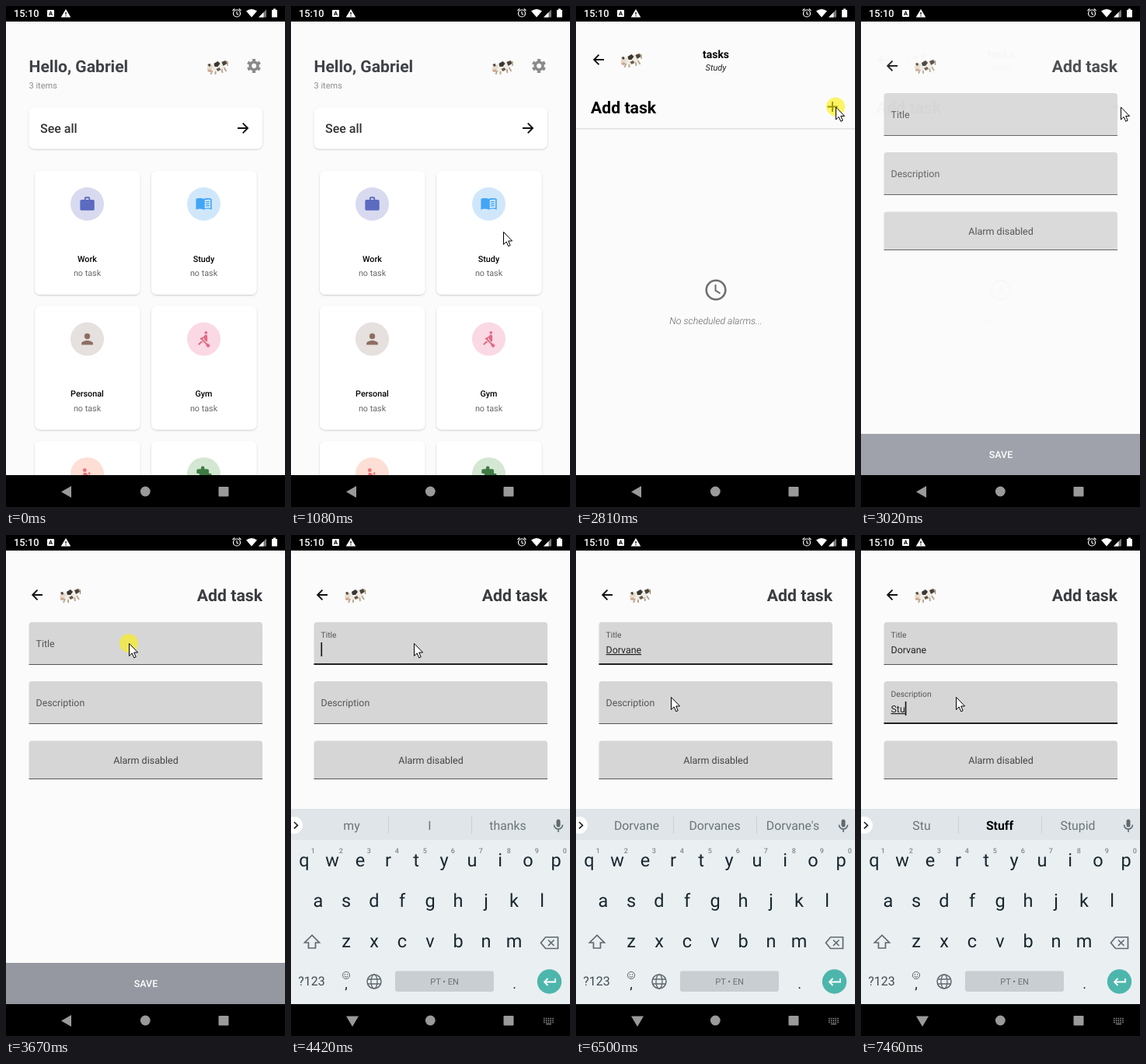
An HTML page for the animation above (8000 ms loop, 359 px wide and 644 px high).

```html
<!DOCTYPE html>
<html lang="en">
<head>
<meta charset="utf-8">
<title>Task app</title>
<style>
  html, body { margin: 0; width: 100%; height: 100%; overflow: hidden; background: #000; }
  svg { display: block; width: 100%; height: 100%; font-family: Roboto, sans-serif; text-rendering: geometricPrecision; }
  .mid { text-anchor: middle; }
  .line { fill: none; stroke: currentColor; }
</style>
</head>
<body>
<svg id="stage" viewBox="0 0 359 644"></svg>
<script>
const LOOP = 8000;
const NAME = 'Gabriel', TITLE = 'Dorvane';

const text = (x, y, size, str, attrs = '') =>
  `<text x="${x}" y="${y}" font-size="${size}" ${attrs}>${str}</text>`;
const mid = (x, y, size, str, attrs = '') => text(x, y, size, str, 'class="mid" ' + attrs);
const rect = (x, y, w, h, fill, attrs = '') =>
  `<rect x="${x}" y="${y}" width="${w}" height="${h}" fill="${fill}" ${attrs}/>`;
const circle = (x, y, r, fill, attrs = '') =>
  `<circle cx="${x}" cy="${y}" r="${r}" fill="${fill}" ${attrs}/>`;
const line = (d, color, width = 2, attrs = '') =>
  `<path class="line" d="${d}" color="${color}" stroke-width="${width}" ${attrs}/>`;
const shape = (d, fill) => `<path d="${d}" fill="${fill}"/>`;
const group = (id, body, attrs = '') => `<g id="${id}" ${attrs}>${body}</g>`;
const at = (x, y, body, scale = 1) => `<g transform="translate(${x} ${y}) scale(${scale})">${body}</g>`;

const backArrow = (x, y) => line(`M${x + 7} ${y}H${x - 6}m6.5 -6.3l-6.3 6.3 6.3 6.3`, '#111', 1.9);

const cow = (x, y) => at(x, y,
  line('M-6 5l-2 5M-2 6l0 4M6 2l1 6M9 1l3 5', '#b9a894', 2) +
  '<ellipse cx="1.5" cy="0" rx="10" ry="5.6" fill="#efece4" transform="rotate(-20)"/>' +
  shape('M-4 -4l5 -3 3 3 -3 4 -4 0z', '#3b3733') +
  shape('M6 -6l5 -2 2 4 -5 3z', '#4a433c') +
  shape('M-1 3l4 -2 2 3 -4 2z', '#6b5a48') +
  line('M11 -7l2.5 1 0 5', '#a58560', 1.2) +
  shape('M-12 -3l4 -1 3 3 -2 6 -4 1 -2 -3z', '#e6dccd') +
  shape('M-12 -3l3 -1 1 3 -2 1z', '#4a433c') +
  '<ellipse cx="-9.5" cy="5.3" rx="2.8" ry="1.8" fill="#d3a68f"/>');

const ICONS = {
  work: c => shape('M20 6h-4V4c0-1.1-.9-2-2-2h-4c-1.1 0-2 .9-2 2v2H4c-1.1 0-2 .9-2 2v11c0 1.1.9 2 2 2h16c1.1 0 2-.9 2-2V8c0-1.1-.9-2-2-2zm-6 0h-4V4h4z', c),
  study: c => shape('M12 5C9 3.5 4 3.5 1 5V20c3-1.5 8-1.5 11 0 3-1.5 8-1.5 11 0V5C20 3.5 15 3.5 12 5z', c) +
    shape('M13.3 6.6c2.4-1 5.6-1.1 8-.5V17.8c-2.5-.6-5.5-.4-8 .5z', '#d0e7fb') +
    line('M14.8 9.2q2.5-.8 5-.4m-5 3.2q2.5-.8 5-.4m-5 3.2q2.5-.8 5-.4', c, 1.4),
  person: c => circle(12, 8, 4, c) + shape('M12 14c-2.7 0-8 1.3-8 4v2h16v-2c0-2.7-5.3-4-8-4z', c),
  row: c => circle(15, 3, 2, c) +
    shape('M8.5 14.5L4 19l1.5 1.5L9 17h2zM21 21l-3 3-3-3v-1.5l-7.1-7.1-.9.1v-2.2c1.7 0 3.6-.9 4.7-2l1.4-1.6c.5-.5 1-.7 1.7-.7C16 6 17 7 17 8.3V14c0 .8-.3 1.6-.9 2.2l-3.6-3.6v-2.3c-.6.5-1.4 1-2.3 1.4L16.500 18H18z', c),
  play: c => circle(8.5, 6.5, 2.6, c) + shape('M6.500 10h4l3 4h-7zM14 9l2.500 1-1 3-2-1z', c),
  puzzle: c => shape('M20.5 11H19V7c0-1.1-.9-2-2-2h-4V3.5a2.5 2.5 0 0 0-5 0V5H4c-1.1 0-2 .9-2 2v3.800h1.500a2.700 2.700 0 0 1 0 5.400H2V20c0 1.100.900 2 2 2h13c1.100 0 2-.900 2-2v-4h1.500a2.500 2.500 0 0 0 0-5z', c)
};

function card(i, icon, name, back, color) {
  const x = 37 + i % 2 * 150, y = 212 + (i >> 1) * 173.6, cx = x + 67.5;
  return rect(x, y, 135.500, 159, '#fff', 'rx="7" filter="url(#shade)"') +
    circle(cx, y + 42.5, 21.5, back) +
    at(cx - 11, y + 31.5, ICONS[icon](color), .92) +
    mid(cx, y + 116.8, 10.8, name, 'font-weight="500"') +
    mid(cx, y + 135, 10.8, 'no task', 'fill="#666"');
}

const gear = line('M324 77a4.900 4.900 0 1 0 0 .01z', '#8a8a8a', 3.6) +
  `<circle cx="319" cy="77" r="7.500" class="line" color="#8a8a8a" stroke-width="3.200" pathLength="12" stroke-dasharray="1 1" stroke-dashoffset=".5" transform="rotate(30 319 77)"/>`;

const home =
  text(29.5, 85, 21.1, `Hello, ${NAME}`, 'font-weight="700" fill="#3f4247"') +
  text(29.5, 106, 11, '3 items', 'fill="#8c8c8c"') + cow(271.5, 78) + gear +
  rect(29.5, 130.5, 300.5, 53, '#fff', 'rx="7" filter="url(#shade)"') +
  text(44, 163.3, 16, 'See all', 'font-weight="500" fill="#333"') +
  line('M298 157h13m-6.300 -6.300l6.300 6.300 -6.300 6.300', '#111', 1.9) +
  card(0, 'work', 'Work', '#d8daef', '#5c6bc0') +
  card(1, 'study', 'Study', '#d0e7fb', '#42a5f5') +
  card(2, 'person', 'Personal', '#e6e0de', '#8d6e63') +
  card(3, 'row', 'Gym', '#fad9e4', '#e06a85') +
  card(4, 'play', '', '#fddfd6', '#f06f75') +
  card(5, 'puzzle', '', '#d3e7d3', '#3f7a45');

const tasks = backArrow(29, 69) + cow(70.5, 69) +
  mid(180, 67, 14, 'tasks', 'font-weight="700"') +
  mid(180, 82.5, 11, 'Study', 'font-style="italic" fill="#222"') +
  text(19, 138, 21.2, 'Add task', 'font-weight="700"') +
  line('M323.500 129.500h13m-6.500 -6.500v13', '#111', 1.9) +
  rect(0, 157, 359, 1.600, '#e0e0e0') +
  circle(180, 365, 12.3, 'none', 'stroke="#6f6f6f" stroke-width="2.600"') +
  line('M179.500 358v7.700l6 3.600', '#6f6f6f', 2) +
  mid(180, 409, 12.3, 'No scheduled alarms...', 'font-style="italic" font-weight="300" fill="#666"');

const field = (id, y, label) =>
  shape(`M29.500 ${y + 55}v-51q0-4 4-4h292.500q4 0 4 4v51z`, '#d6d6d6') +
  `<rect id="${id}Bar" x="29.500" width="300.500"/>` +
  `<text id="${id}Label" x="38.500" fill="#555">${label}</text>` +
  `<text id="${id}Text" x="38.500" y="${y + 40}" font-size="12.400" fill="#222"></text>` +
  `<rect id="${id}Caret" y="${y + 26}" width="1.600" height="18" fill="#111"/>`;

const add = rect(0, 20, 359, 583, '#fbfbfb') + backArrow(40, 77) + cow(82, 77) +
  text(330, 85, 21.2, 'Add task', 'font-weight="700" fill="#3a3c40" text-anchor="end"') +
  field('title', 112, 'Title') + field('desc', 188, 'Description') +
  shape('M29.500 314v-45.500q0-4 4-4h292.500q4 0 4 4v45.500z', '#d6d6d6') +
  rect(29.5, 313, 300.5, 1, '#555') +
  mid(180, 294, 12.5, 'Alarm disabled', 'fill="#444"') +
  rect(0, 550, 359, 53, '#9598a1') +
  mid(180, 581, 12.4, 'SAVE', 'font-weight="500" fill="#fff"');

const keyRow = (chars, x, y) => [...chars].map((c, i) => mid(x + 36 * i, y, 23.5, c)).join('');
const GREY = '#5f6a70';

const keyboard = rect(0, 352, 359, 251, '#eaeff2') + rect(0, 352, 359, 40, '#dfe5e8') +
  circle(4, 373, 11, '#fff') + line('M4 369l4.500 4.200 -4.500 4.200', '#222', 1.7) +
  rect(125, 362, 1, 22, '#c9d0d4') + rect(232, 362, 1, 22, '#c9d0d4') +
  [78, 178.5, 279].map((x, i) => mid(x, 379, 15.8, '', `id="hint${i}" fill="#6b7479"`)).join('') +
  rect(341.5, 365.5, 5, 10, GREY, 'rx="2.500"') +
  line('M338.500 372.500a5.500 5.500 0 0 0 11 0m-5.500 5.500v4', GREY, 1.6) +
  `<g fill="#18272e">` + keyRow('qwertyuiop', 17, 426) + keyRow('asdfghjkl', 35, 478) +
  keyRow('zxcvbnm', 71, 530) + mid(71, 583, 18, ',') + mid(287.5, 583, 18, '.') + '</g>' +
  [...'1234567890'].map((c, i) => mid(28.3 + 36 * i, 408.5, 9, c, `font-weight="500" fill="#80888d"`)).join('') +
  line('M27 514.500l-9.500 9.500h5v7h9v-7h5z', GREY, 1.7) +
  line('M327.500 517h16v14.500h-16l-6 -7.250zM331 520.500l7.500 7.500m0 -7.500l-7.500 7.500', GREY, 1.7) +
  mid(26.5, 579, 16, '?123', 'fill="#414d54"') +
  circle(71, 566, 4.6, 'none', `stroke="${GREY}"`) +
  line('M68.500 567q2.500 3 5 0', GREY, 1) + circle(69.4, 564.7, .8, GREY) + circle(72.6, 564.7, .8, GREY) +
  circle(107, 574, 9, 'none', `stroke="${GREY}" stroke-width="1.500"`) +
  `<ellipse cx="107" cy="574" rx="4" ry="9" class="line" color="${GREY}" stroke-width="1.300"/>` +
  line('M99 571h16m-16 6h16', GREY, 1.3) +
  rect(134, 560.5, 127, 26.5, '#c8ced1', 'rx="3"') +
  mid(197.5, 578, 11, 'PT • EN', 'fill="#6a7277"') +
  circle(332.5, 574, 15.7, '#4db6ac') +
  line('M340 570v4.500h-14m4.500 -4.500l-4.500 4.500 4.500 4.500', '#fff', 1.8);

const status = rect(0, 0, 359, 20, '#000') +
  text(10, 14, 12.8, '15:10', 'font-weight="500" fill="#fff"') +
  rect(53, 5, 9, 9, '#fff', 'rx="1"') + mid(57.5, 12.3, 7.5, 'A', 'font-weight="700"') +
  shape('M77 4l6.300 10.500h-12.600z', '#fff') + rect(76.4, 8, 1.2, 3, '#000') + rect(76.4, 12, 1.2, 1.2, '#000') +
  circle(297, 9.5, 4.5, 'none', 'stroke="#fff" stroke-width="1.200"') +
  line('M297 7v3l2 1.200M291.500 6l2.800 -2.500m8.200 2.500l-2.800 -2.500', '#fff', 1.1) +
  shape('M309 6.500q7 -5 14 0l-7 8z', '#fff') +
  shape('M325 14.500l10 -10v10z', '#777') + shape('M325 14.500l6.500 -6.500v6.500z', '#fff') +
  shape('M342 5h2v-1.500h3v1.500h2v9.500h-7z', '#fff');

const nav = rect(0, 603, 359, 41, '#000') +
  `<path id="back" fill="#9a9a9a"/>` + circle(179.3, 624, 6.4, '#9a9a9a') +
  rect(273.5, 618, 13, 12.5, '#9a9a9a', 'rx="1"') +
  group('switcher', line('M325 621.500h13m-13 2.500h13m-13 2.500h13', '#8a8a8a', 1.4, 'stroke-dasharray="1.600 1.200"') +
    rect(328, 628, 7, 1.2, '#8a8a8a'));

const pointer = circle(0, 0, 12, '#fff000', 'id="click" opacity=".6"') +
  '<path d="M.5 .5V16.500L4.200 13 6.700 18.800 9.200 17.700 6.700 12H11.600z" fill="#fff" stroke="#000"/>';

const stage = document.getElementById('stage');
stage.innerHTML = `<defs><filter id="shade" x="-10%" y="-10%" width="120%" height="120%">
  <feDropShadow dx="0" dy="1" stdDeviation="1" flood-opacity=".2"/></filter></defs>` +
  rect(0, 0, 359, 644, '#fbfbfb') + group('home', home) + group('tasks', tasks) +
  group('add', add) + group('keyboard', keyboard) + status + nav + group('pointer', pointer);

// Each track lists [start time, ...values]; a value holds until the next start.
const TRACKS = {
  pointer: [[0, -50, -50], [210, 290, 578], [320, 288, 490], [430, 284, 385], [530, 280, 310], [640, 278, 284],
    [970, 275, 287], [1080, 273, 290], [1730, 290, 312], [1850, 306, 332], [2060, 311, 316], [2170, 322, 270],
    [2270, 335, 205], [2380, 342, 155], [2490, 338, 135], [2590, 334, 129.5], [3240, 306, 130], [3350, 240, 134],
    [3450, 185, 138], [3560, 158, 139], [6280, 150, 153], [6390, 130, 195], [6500, 122, 208]],
  click: [[0, 0], [1410, 1], [1520, 0], [2810, 1], [2910, 0], [3670, 1], [3780, 0], [6600, 1], [6710, 0]],
  home: [[0, 1], [1520, 0]],
  tasks: [[0, 0], [1520, 1], [2910, .6], [3020, .2], [3130, 0]],
  add: [[0, 0], [2910, .35], [3020, .9], [3130, 1]],
  drop: [[0, 260], [3780, 170], [3880, 40], [3990, 0]],
  caret: [[0, ''], [4420, 'title'], [4970, ''], [5190, 'title'], [6280, ''], [6710, 'desc']],
  focus: [[0, ''], [3780, 'title'], [6710, 'desc']],
  title: [[0, 0], [5190, 1], [5300, 2], [5620, 4], [5730, 5], [5840, 7]],
  desc: [[0, 0], [7030, 1], [7350, 2], [7460, 3]],
  hints: [[0, 'my', 'I', 'thanks'], [5190, 'D', 'Do', 'Did'], [5400, 'Do', 'Does', 'Down'],
    [5620, 'Dorv', 'Drove', 'Doors'], [5840, TITLE, TITLE + 's', TITLE + "'s"], [6710, 'my', 'I', 'thanks'],
    [7030, 'S', 'So', 'Sorry'], [7350, 'St', 'Still', 'Stop'], [7460, 'Stu', 'Stuff', 'Stupid']]
};
const held = (name, t) => TRACKS[name].findLast(k => k[0] <= t).slice(1);
const $ = id => document.getElementById(id);
const set = (id, attrs) => { for (const k in attrs) $(id).setAttribute(k, attrs[k]); };
const show = (id, on) => set(id, { visibility: on ? 'visible' : 'hidden' });

function drawField(id, y, word, t) {
  const focused = held('focus', t)[0] === id;
  const typed = word.slice(0, held(id, t)[0]);
  const raised = focused || typed;
  set(id + 'Label', { y: y + (raised ? 20.3 : 32), 'font-size': raised ? 10.3 : 12.4 });
  set(id + 'Bar', { y: y + (focused ? 53 : 54), height: focused ? 2 : 1, fill: focused ? '#222' : '#555' });
  set(id + 'Text', { 'text-decoration': focused ? 'underline' : 'none' });
  $(id + 'Text').textContent = typed;
  set(id + 'Caret', { x: 38.5 + (typed ? $(id + 'Text').getComputedTextLength() : 0) });
  set(id + 'Caret', { opacity: held('caret', t)[0] === id ? 1 : 0 });
}

function draw() {
  const t = performance.now() % LOOP;
  for (const page of ['home', 'tasks', 'add']) set(page, { opacity: held(page, t)[0] });
  drawField('title', 112, TITLE, t);
  drawField('desc', 188, 'Stu', t);

  const typing = t >= 3780;
  set('keyboard', { transform: `translate(0 ${held('drop', t)[0]})` });
  show('keyboard', typing);
  held('hints', t).forEach((word, i) => $('hint' + i).textContent = word);
  const strong = t >= 7460;
  set('hint1', { fill: strong ? '#000' : '#6b7479', 'font-weight': strong ? 700 : 400 });
  set('back', { d: typing ? 'M71 618.500h16l-8 13.500z' : 'M71 624.500l13 -7.500v15z' });
  show('switcher', typing);

  set('pointer', { transform: `translate(${held('pointer', t).join(' ')})` });
  show('click', held('click', t)[0]);
  requestAnimationFrame(draw);
}
draw();
</script>
</body>
</html>
```
